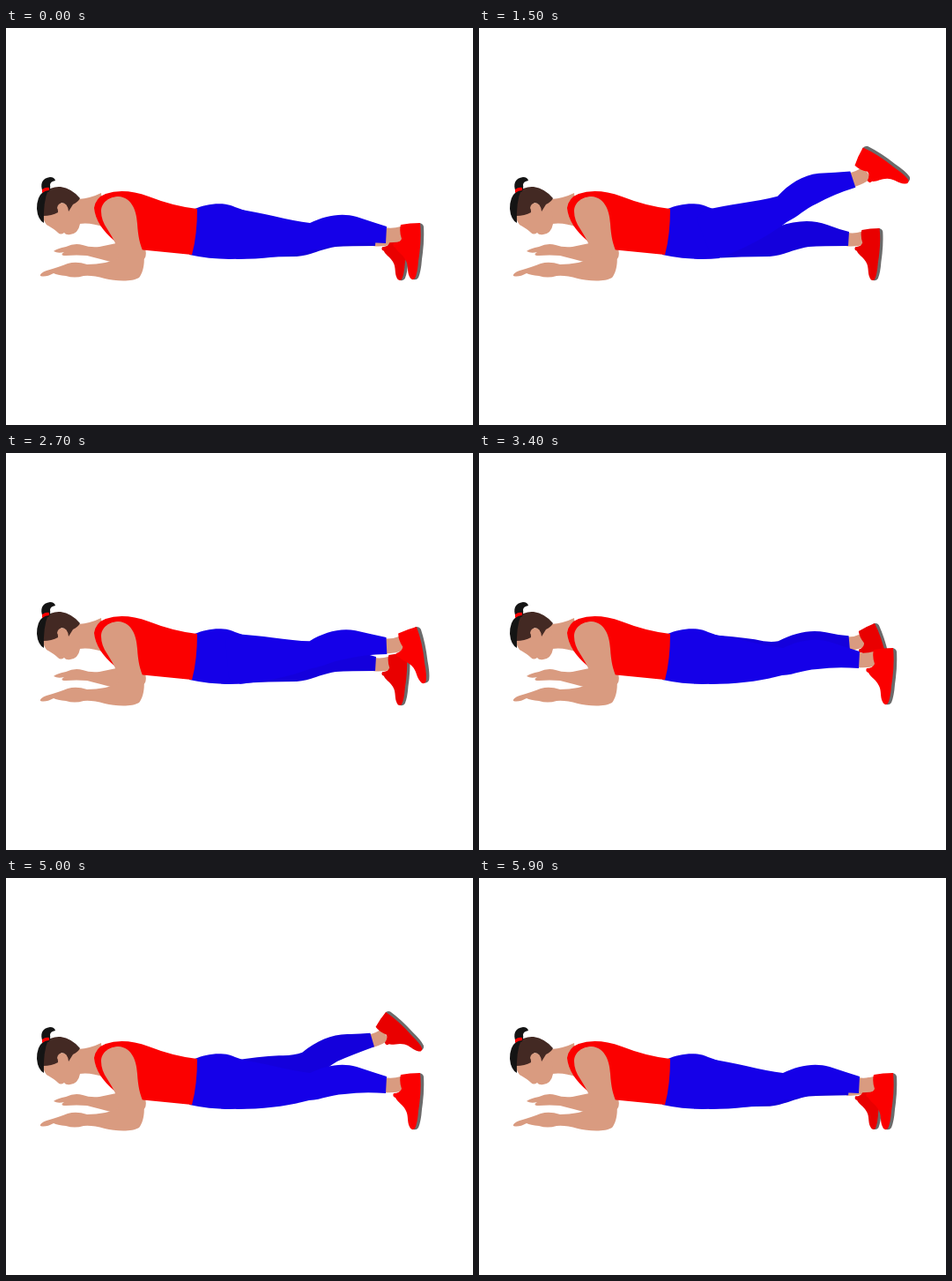
Recreate the animation shown at these times as an HTML page. Size 530 by 450 pixels, loop 6 s.

```html
<!DOCTYPE html>
<html lang="en">
<head>
<meta charset="utf-8">
<title>Plank leg raise</title>
<style>
  html, body { margin: 0; width: 100%; height: 100%; overflow: hidden; background: #fff; }
  svg { display: block; width: 530px; height: 450px; }
  .skin { fill: #d99b80; }
  .near { fill: #1500e8; color: #fb0000; }
  .far { fill: #1400dc; color: #e90000; }
  .shirt { fill: #fb0000; }
  .black { fill: #141414; }
</style>
</head>
<body>
<svg viewBox="0 0 530 450">
  <defs>
    <!-- Ankle joint at 0,0 -->
    <path id="ankle" class="skin" d="M-11-8 Q-2-6 8-9 L11 7 Q2 10-11 9Z"/>
    <g id="shoe">
      <path fill="#6b6b6b" d="M28-13 Q33-13 34-9 Q35 8 32 28 Q31 42 28 49 Q26 52 22 51Z"/>
      <path fill="currentColor" d="M8-11 Q18-13 30-13 Q32 6 28 30 Q27 44 24 50 Q20 53 18 48 C15 42 17 36 14 30 C11 23 4 20 2 15 Q-2 14 0 10 Q7 10 9 5 Q6-4 8-11Z"/>
    </g>
  </defs>

  <g id="farLeg" class="far">
    <use href="#ankle" transform="translate(427 239) scale(.92)"/>
    <path d="M250 210 L262 206 Q292 212 314 219 Q328 225 340 225 C360 218 378 217 395 223 Q408 228 420 231 L419 247 Q390 247 374 248 C356 251 345 258 330 259 Q300 259 262 261 L250 255Z"/>
    <g id="farFoot"><use href="#shoe" transform="translate(427 239) scale(.92)"/></g>
  </g>

  <path class="near" d="M214 205 C226 200 246 196 260 203 Q266 205 271 207 L273 261 Q240 264 208 257Z"/>

  <g id="nearLeg" class="near">
    <use href="#ankle" transform="translate(440 234)"/>
    <path d="M250 210 L262 205 Q285 209 303 213 Q328 219 345 221 C362 213 380 209 398 214 Q416 220 432 225 L431 244 Q405 242 384 245 C366 246 360 251 344 252 C322 258 295 262 262 262 L250 255Z"/>
    <g id="nearFoot"><use href="#shoe" transform="translate(440 234)"/></g>
  </g>

  <path class="skin" d="M54 253 Q58 250 68 248 Q78 243 87 246 Q95 249 106 248 L130 243 L158 250 Q161 262 153 264 L126 267 Q104 261 92 258 Q80 257 68 258 Q60 258 66 254 Q59 256 54 253Z"/>
  <path class="skin" d="M70 205 L82 194 Q96 193 108 187 L112 226 Q96 220 83 222 L74 225Z"/>
  <path class="shirt" d="M100 204 Q102 192 113 188 Q134 181 162 191 Q190 202 217 205 Q217 235 211 257 L150 251 L124 242 Q102 224 100 204Z"/>
  <path class="skin" d="M108 208 C108 197 118 191 128 191 C141 192 148 204 149 222 C150 238 152 244 156 255 C158 265 156 277 151 283 C143 288 124 287 112 284 Q98 280 88 281 Q78 284 68 281 Q58 280 54 278 Q45 283 39 281 Q38 278 46 275 Q60 271 70 267 Q80 264 92 268 Q113 268 128 261 C127 246 120 236 115 228 Q108 218 108 208Z"/>

  <path class="skin" d="M42 211 L60 198 L82 200 L84 222 Q82 233 73 234 Q68 235 66 232 Q62 235 59 232 Q55 228 46 223 Q42 218 42 211Z"/>
  <path fill="#432923" d="M42 187 Q52 179 62 180 Q75 182 84 193 Q82 197 76 200 L71 208 Q70 198 63 198 Q58 200 59 209 Q52 213 42 213Z"/>
  <path class="skin" d="M58 204 Q59 198 65 199 Q71 202 68 208 Q64 212 60 208Z"/>
  <path class="black" d="M48 183 Q42 197 43 221 Q36 217 35 205 Q35 191 42 186Z"/>
  <path class="black" d="M42 186 C38 177 41 170 50 169 Q55 169 56 173 Q50 174 50 178 Q51 183 48 186Z"/>
  <path class="shirt" d="M41 183 Q45 180 49 181 L49 184 Q45 184 41 187Z"/>
</svg>
<script>
  const LOOP = 6000, STEP = 100, SWING = 2950;
  const get = id => document.getElementById(id);
  const legs = [
    { leg: get('nearLeg'), foot: get('nearFoot'), ankle: '440 234', start: 80, lift: 21.5, flex: 1.8 },
    { leg: get('farLeg'), foot: get('farFoot'), ankle: '427 239', start: 2980, lift: 25.5, flex: 1.5 }
  ];

  function draw(time) {
    for (const { leg, foot, ankle, start, lift, flex } of legs) {
      const phase = Math.min(1, Math.max(0, (time - start) / SWING));
      const angle = -lift * Math.sin(Math.PI * phase) ** 1.3 || 0;
      leg.setAttribute('transform', `rotate(${angle.toFixed(3)} 262 222)`);
      foot.setAttribute('transform', `rotate(${(angle * flex).toFixed(3)} ${ankle})`);
    }
  }

  const begin = performance.now();
  function tick() {
    const time = (performance.now() - begin) % LOOP;
    draw(Math.floor(time / STEP) * STEP);
    requestAnimationFrame(tick);
  }
  tick();
</script>
</body>
</html>
```
